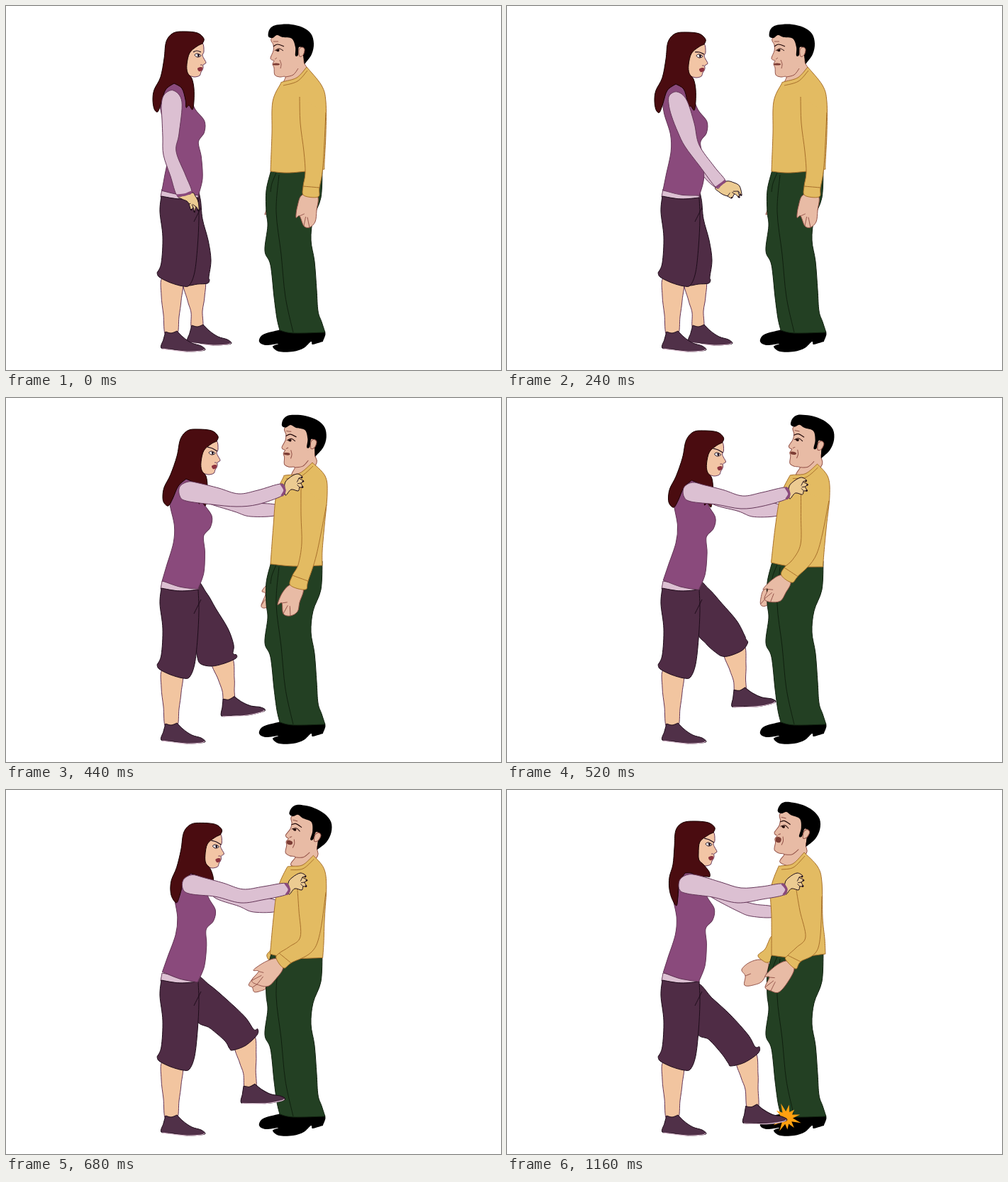
Recreate the animation shown at these times as an HTML page with a canvas. Size 698x513 px, loop 1200 ms.

```html
<!DOCTYPE html>
<html lang="en">
<head>
<meta charset="utf-8">
<title>Self-defence: push and stamp</title>
<style>
html, body { margin: 0; width: 100%; height: 100%; overflow: hidden; background: #fff; }
canvas { display: block; }
</style>
</head>
<body>
<canvas id="stage" width="698" height="513"></canvas>
<script>
const ctx = document.getElementById('stage').getContext('2d');
const LOOP = 1200, STEP = 40, IMPACT = 760;
const TIMES = [0, 240, 320, 440, 600, 800];   // times of the key poses

const ink = { dark: '#1e0c1a', plum: '#643658', orange: '#a8702c', flesh: '#94544a', green: '#10200f' };
const tone = {
  hair: '#4a0c10', top: '#8a4a7c', sleeve: '#dcc0d2', band: '#dcc0d2', pants: '#4f2c45',
  leg: '#f2c5a0', face: '#f2c5a5', hand: '#eccb92', shoe: '#503048',
  skin: '#e8bba5', shirt: '#e3bb62', trousers: '#234023', burst: '#ffa010'
};

const nums = s => s.split(/[ ,|]+/).map(Number);
const shift = (s, dx, dy) => nums(s).map((v, i) => v + (i % 2 ? dy : dx)).join(' ');

// One point list per key pose; an empty entry repeats the pose before it.
function track(...poses) {
  let last;
  return poses.map(s => last = s ? nums(s) : last);
}

let seg = 0, part = 0;
function setTime(t) {
  seg = 0;
  while (seg < TIMES.length - 2 && t >= TIMES[seg + 1]) seg++;
  part = Math.min(1, (t - TIMES[seg]) / (TIMES[seg + 1] - TIMES[seg]));
}
const now = tr => tr[seg].map((v, i) => v + (tr[seg + 1][i] - v) * part);

// Smooth curve through the points; a repeated point makes a corner.
function trace(p, open) {
  const n = p.length / 2;
  const at = i => {
    i = open ? Math.max(0, Math.min(n - 1, i)) : (i + n) % n;
    return [p[2 * i], p[2 * i + 1]];
  };
  ctx.beginPath();
  ctx.moveTo(p[0], p[1]);
  for (let i = 0; i < (open ? n - 1 : n); i++) {
    const [a, b, c, d] = [at(i - 1), at(i), at(i + 1), at(i + 2)];
    if (b[0] === c[0] && b[1] === c[1]) continue;
    ctx.bezierCurveTo(b[0] + (c[0] - a[0]) / 6, b[1] + (c[1] - a[1]) / 6,
      c[0] - (d[0] - b[0]) / 6, c[1] - (d[1] - b[1]) / 6, c[0], c[1]);
  }
}
function shape(p, fill, stroke, open) {
  trace(typeof p === 'string' ? nums(p) : p, open);
  ctx.fillStyle = fill;
  ctx.fill();
  if (stroke) { ctx.strokeStyle = stroke; ctx.lineWidth = 1; ctx.stroke(); }
}
function line(p, color, width = 1) {
  trace(typeof p === 'string' ? nums(p) : p, true);
  ctx.strokeStyle = color;
  ctx.lineWidth = width;
  ctx.stroke();
}
function placed(x, y, angle, paint, px = 0, py = 0) {
  ctx.save();
  ctx.translate(x + px, y + py);
  ctx.rotate(angle);
  ctx.translate(-px, -py);
  paint();
  ctx.restore();
}
// Creases run from the gaps between fingers towards the palm; nails sit on the tips.
function hand(p, fill, stroke, gaps, tips = []) {
  shape(p, fill, stroke);
  const n = p.length / 2;
  let cx = 0, cy = 0;
  p.forEach((v, i) => i % 2 ? cy += v / n : cx += v / n);
  const inward = (i, k, width) => {
    const x = p[2 * i], y = p[2 * i + 1];
    line([x, y, x + (cx - x) * k, y + (cy - y) * k], stroke, width);
  };
  gaps.forEach(i => inward(i, .7, 1));
  tips.forEach(i => inward(i, .2, 2));
}

// ---- woman ----
const lean = track('-.053', '-.032', '0', '.053', '.128', '.075');
const herHead = track('-10 -4', '-9 -3', '0 0', '10 4', '23 8', '4 3');
const herBrow = track('274 69|279 67|285 69', '274 68|280 68|287 71', '274 65|281 67|288 71', '', '', '');
const hair = track(
  '262,40|246,42|236,54|233,78|228,104|219,122|217,136|219,149|224,153|229,140|235,122|247,113|247,113|258,120|263,136|264,147|268,144|273,150|275,138|275,120|272,106|266,98|265,86|269,70|279,61|287,57|287,57|289,50|280,42',
  '', '',
  '260,40|246,42|236,54|231,78|222,104|213,122|211,136|213,144|219,148|225,138|233,120|244,110|244,110|258,118|262,136|262,145|266,142|271,148|273,138|274,120|272,106|266,98|265,86|269,70|279,61|287,57|287,57|289,50|280,42',
  '',
  '261,41|244,43|234,54|232,78|230,102|225,120|225,137|229,151|235,160|237,148|239,128|247,114|247,114|256,114|262,118|267,119|272,119|278,119|282,119|281,112|273,102|267,96|266,86|268,70|279,61|287,57|287,57|289,50|280,43');
const nearArm = track(
  '236,119|223,125|219,140|220,160|221,185|222,210|232,240|241,267|252,266|262,262|253,238|240,205|244,180|248,135',
  '240,121|229,126|228,138|232,155|241,178|251,198|272,226|295,256|302,251|308,246|292,226|271,196|264,165|253,132',
  '250,115|238,122|238,136|247,144|285,147|322,148|350,142|380,132|384,124|382,115|350,125|322,131|290,122|265,117',
  '257,118|245,125|245,138|254,145|290,150|325,153|355,150|389,138|393,130|388,121|355,130|328,135|300,127|272,120',
  '266,120|254,127|254,140|265,147|300,150|335,159|365,155|399,147|403,140|398,131|365,136|337,141|310,132|283,125',
  '256,119|244,126|243,140|254,146|290,151|325,159|360,154|390,148|394,140|388,132|360,136|330,138|302,130|272,121');
const grip = '386,130|385,114|391,106|402,100|410,104|405,106|412,110|408,113|411,119|406,119|404,124|394,122';
const nearHand = track(
  '243,268|262,263|267,268|271,276|272,289|268,283|266,291|264,284|261,288|258,279|255,275|248,272',
  '294,256|309,247|320,249|328,254|331,267|326,261|328,270|321,265|317,271|311,268|305,266|299,262',
  grip, shift(grip, 8, 7), shift(grip, 17, 17), shift(grip, 7, 17));
const farArm = track(
  '235,130|240,180|240,220|245,255|250,255|245,220|245,180|245,135',
  '245,135|262,180|278,215|300,250|296,257|275,237|258,200|240,150',
  '255,130|300,146|345,150|376,151|376,165|348,166|325,161|272,145',
  '262,130|310,145|350,148|382,151|382,165|345,167|322,160|280,146',
  '290,121|315,130|342,140|387,150|387,165|352,168|330,159|295,150',
  '285,145|325,155|350,161|376,165|376,179|345,178|326,171|290,152');
const farPants = track(
  '268,262|274,272|277,300|285,330|289,358|286,382|287,386|284,391|270,392|258,394|256,390|256,370|258,345', '', '',
  '268,261|283,275|296,297|313,325|321,348|320,360|325,362|324,367|308,374|290,378|275,375|270,366|268,342',
  '268,258|285,262|310,282|335,303|349,321|354,320|354,328|340,344|322,352|317,350|312,341|290,325|268,310',
  '268,275|290,294|315,317|340,345|350,362|356,362|354,371|335,384|316,389|312,385|303,372|285,352|267,339');
const farCalf = track(
  '250,385|256,415|261,432|262,455|277,455|277,430|280,410|279,385', '', '',
  '290,370|299,396|305,413|308,432|322,432|322,412|322,395|318,365',
  '323,345|329,370|334,385|336,406|351,406|351,378|352,355|349,330',
  '324,380|330,405|336,422|339,450|354,450|354,420|354,400|350,370');
const farFoot = track('256 473 0', '', '', '304 448 -.165', '331 422 -.13', '333 469 -.1');

function shoe(x, y, angle) {
  placed(x, y, angle, () => {
    shape('0,0|3,-12|6,-23|6,-23|14,-21|22,-24|22,-24|31,-15|43,-7|56,-3|62,2|56,4|36,5|16,2', tone.shoe, ink.dark);
    line('1,1|16,3|36,5|56,4|61,2', tone.sleeve, 1.2);
  });
}
function herLegs() {
  shape(now(farCalf), tone.leg, ink.plum);
  shoe(...now(farFoot));
  shape(now(farPants), tone.pants, ink.dark);
  shape('221,382|219,408|222,435|225,464|241,464|244,438|247,415|248,385', tone.leg, ink.plum);
  shoe(219, 482, 0);
  shape('220,258|220,258|218,269|218,269|245,272|271,271|271,271|271,262|271,262|245,262', tone.band, ink.plum);
  shape('219,268|219,268|217,290|221,325|219,362|213,376|213,376|216,382|232,390|250,395|259,393|266,375|270,340|272,300|271,270|271,270|245,272', tone.pants, ink.dark);
  line('275,284|270,294|265,304', ink.dark);
}
function herHeadParts() {
  shape('255,60|275,53|287,56|289,68|287,73|289,78|292,84|288,87|288,91|287,94|285,97|283,102|276,104|268,103|264,110|252,110', tone.face, ink.plum);
  shape('280,92|284,90|287,91|286,95|282,96', '#8e3440');
  shape('276,73|280,71|285,74|280,76', '#fff', ink.dark);
  shape('280,72|283,73|281,76', ink.dark);
  line(now(herBrow), ink.dark, 1.2);
  line('287,87|284,87', ink.plum);
  shape(now(hair), tone.hair, '#180000');
}
function herUpper() {
  placed(0, 0, now(lean)[0], () =>
    shape('248,107|232,113|224,126|225,150|233,180|233,205|225,238|220,259|220,259|245,266|271,268|271,268|278,245|278,215|275,193|284,180|285,164|273,147|262,120', tone.top, ink.plum),
    245, 262);
  placed(...now(herHead), 0, herHeadParts);
  hand(now(nearHand), tone.hand, ink.dark, [5, 7, 9], [4, 6, 8]);
  const arm = now(nearArm);
  shape(arm, tone.sleeve, ink.plum);
  line(arm.slice(14, 20), tone.top, 3.5);
}

// ---- man ----
const hisHead = track('0 0 0', '', '', '17 -1 .1', '35 1 .27', '6 -6 .25');
const mouth = track('5 1.6', '', '', '4.5 1.8', '4.5 2.4', '4 4');
const shirt = track(
  '387,110|376,135|375,180|373,233|373,233|400,235|449,230|449,230|449,220|451,180|451,135|445,112|424,86|424,86|410,101|390,107', '', '',
  '391,112|381,137|377,180|373,234|373,234|405,237|446,236|446,236|446,215|449,180|453,135|450,110|432,91|432,91|414,106|394,109',
  '404,112|390,140|380,180|372,230|372,230|400,238|445,240|445,240|448,220|452,180|457,140|455,112|443,95|443,95|428,107|410,108',
  '382,110|372,140|373,180|373,233|373,233|405,236|449,231|449,231|448,210|445,180|444,130|438,108|419,88|419,88|403,104|386,107');
const hisArm = track(
  '414,128|415,165|420,205|422,235|419,254|420,267|440,269|442,256|447,225|451,150', '', '',
  '416,125|416,165|417,205|412,235|404,250|401,264|422,270|426,258|438,220|452,150',
  '413,135|413,170|411,207|394,220|378,228|373,236|381,250|394,245|436,218|456,140',
  '407,135|413,170|421,207|408,222|396,233|393,239|407,252|414,242|439,222|444,150');
const hisHand = track(
  '418,266|411,282|409,298|414,296|420,310|428,312|436,304|438,288|439,268', '', '',
  '402,263|390,274|383,291|389,289|391,304|401,307|411,301|414,288|419,269',
  '374,236|358,238|339,248|347,250|335,262|342,268|360,271|372,261|381,250',
  '396,241|380,247|364,262|370,264|364,278|372,283|383,285|395,272|405,252');
const hisFarHand = track(
  '372,275|367,288|365,294|368,293|370,296|374,296|376,290|376,276', '', '',
  '370,262|361,272|366,276|360,292|363,296|370,294|376,288|376,265',
  '375,262|362,270|350,288|355,289|360,291|366,289|372,285|380,270',
  '357,239|342,243|331,253|336,262|335,275|347,275|361,268|369,245');
const hisFarSleeve = track(
  '382,210|380,225|377,232|378,240|380,243|388,235', '', '', '', '',
  '374,206|364,224|354,233|360,240|368,243|380,235');

function hisHeadParts() {
  shape('375,45|377,55|377,63|373,73|375,76|378,77|376,82|378,87|379,97|386,100|394,100|391,112|412,112|424,90|420,78|423,55|400,35', tone.skin, ink.flesh);
  line('394,100|405,97|412,88', ink.flesh);
  shape('376,45|370,43|371,34|377,28|388,26|402,26|418,30|430,39|434,53|431,68|421,82|421,82|419,70|419,60|413,58|412,69|408,70|408,58|403,46|390,44|382,41', '#000');
  shape('413,62|417,58|421,61|419,69|414,71', tone.skin, ink.flesh);
  line('377,57|383,54|392,57', '#200808', 1.2);
  line('379,63|385,60|391,63', '#200808');
  shape('381,62|385,61|385,64|382,64', '#200808');
  line('377,50|384,50', ink.flesh);
  line('379,75|382,73', ink.flesh);
  line('386,76|388,82|387,88', ink.flesh);
  const [w, h] = now(mouth);
  ctx.beginPath();
  ctx.ellipse(381, 82, w, h, 0, 0, 7);
  ctx.fillStyle = '#7c3c34';
  ctx.fill();
}
function man() {
  hand(now(hisFarHand), tone.skin, ink.flesh, [3]);
  shape(now(hisFarSleeve), tone.shirt, ink.orange);
  shape('357,473|361,464|375,459|400,455|447,457|447,473|447,473|440,475|432,477|430,473|420,482|405,487|385,487|376,480|384,476|366,478', '#000');
  shape('374,231|374,231|367,260|367,290|369,310|365,345|373,365|378,410|382,440|386,457|386,457|405,461|450,460|450,460|445,445|440,430|438,400|435,360|430,330|433,300|444,270|446,230|446,230', tone.trousers, ink.green);
  line('385,238|381,290|388,350|394,410|405,460', ink.green);
  line('381,235|375,250|373,262', ink.green);

  const [x, y, angle] = now(hisHead);
  placed(x, y, angle, hisHeadParts, 402, 62);
  const body = now(shirt);
  shape(body, tone.shirt, ink.orange);
  line(body.slice(26).map((v, i) => v + (i % 2 ? 5 : 1)), ink.orange);
  hand(now(hisHand), tone.skin, ink.flesh, [3, 4, 5]);
  const arm = now(hisArm);
  shape(arm, tone.shirt, ink.orange, true);
  line([...arm.slice(8, 10), ...arm.slice(14, 16)], ink.orange);
}

function burst() {
  ctx.beginPath();
  for (let i = 0; i < 22; i++) {
    const r = i % 2 ? 9 : 19 + 3 * Math.sin(i * 2.3), a = i * Math.PI / 11 - 1.37;
    ctx.lineTo(394 + r * Math.cos(a), 462 + r * Math.sin(a));
  }
  ctx.fillStyle = tone.burst;
  ctx.fill();
}

function frame() {
  const t = Math.floor(performance.now() % LOOP / STEP) * STEP;
  setTime(t);
  ctx.fillStyle = '#fff';
  ctx.fillRect(0, 0, 698, 513);
  ctx.lineJoin = 'round';
  shape(now(farArm), tone.sleeve, ink.plum);
  man();
  if (t >= IMPACT) burst();
  herLegs();
  herUpper();
  requestAnimationFrame(frame);
}
frame();
</script>
</body>
</html>
```
